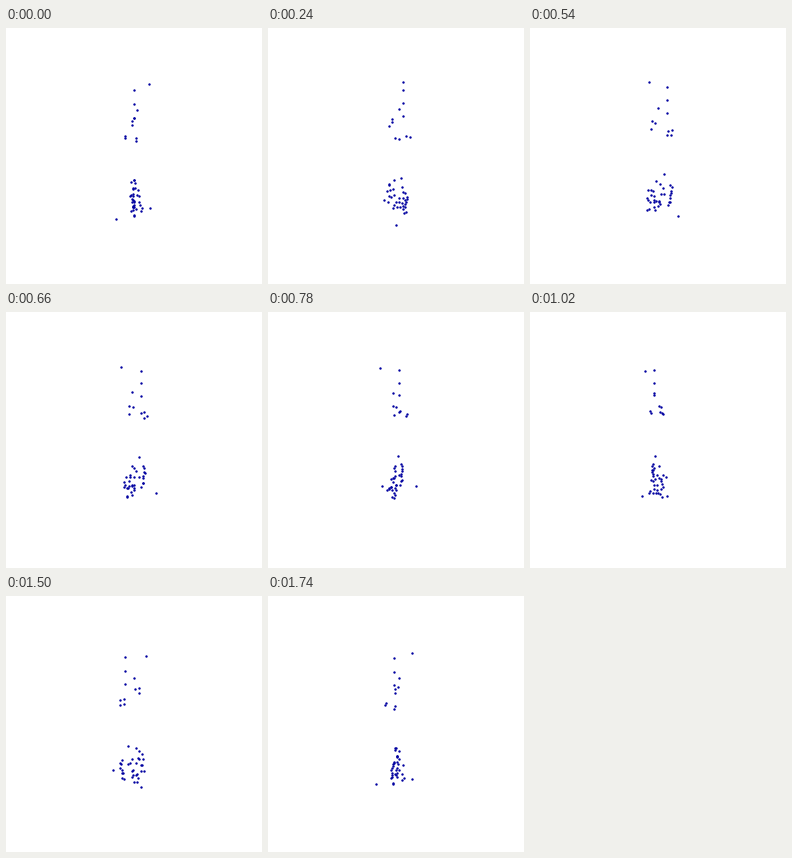
These frames come from a looping animation (256x256 px, 1800 ms). A matplotlib script:

```python
from itertools import product

import numpy as np
import matplotlib.pyplot as plt
from matplotlib.animation import FuncAnimation

SIZE, FRAMES, STEP_MS = 256, 30, 60
CX, CY = 127.7, 127.6
TILT, VIEW = 0.52, 235   # camera tilt and viewing distance
rng = np.random.default_rng(4)


def cluster(n, center, spread, top, bottom, flare=0):
    """Random points on evenly spaced heights, wider below when flared."""
    level = np.linspace(0, 1, n)
    width = 1 + flare * (level - 0.5)
    offset = rng.uniform(-1, 1, (n, 2)) * spread * width[:, None]
    heights = top + (bottom - top) * level
    return np.column_stack([np.array(center) + offset, heights])


# each point: side offset, depth, resting height on the stage
stem = [(0, -9.6, 60.5 + 13 * i) for i in range(3)]
frame = [(-3.1 + 5 * a, -11.6 - 2.6 * a + 2.4 * b, 105.4)
         for a, b in product((-1, 1), repeat=2)]
joints = [(15.6, 4.1, 57.4), (3.2, -1.1, 81.8), (0.8, 5.5, 92.8),
          (-1.8, 3.1, 94.5), (-2, 7.4, 100), (0.4, -7, 148), (0, 2.2, 153.4),
          (-16.3, -15, 179.5), (16.3, -1.1, 179.7)]
cloud = np.vstack([
    stem, frame, joints,
    cluster(9, (-2, -12.7), (2, 2.6), 160, 180),
    cluster(11, (-0.5, 7), (6, 5), 159, 181, flare=1),
    cluster(6, (4, -0.5), (6, 4), 178.5, 180),
    cluster(5, (0, -4.5), (5, 4), 160, 174),
])
side, depth, height = cloud.T


def project(turn):
    """Turn the cloud about its vertical axis and put it in perspective."""
    c, s = np.cos(turn), np.sin(turn)
    away = side * s + depth * c
    scale = 1 / (1 + away / VIEW)
    x = CX + (side * c - depth * s) * scale
    y = CY + (height - 128 - TILT * away) * scale
    return x, y


fig = plt.figure(figsize=(SIZE / 72, SIZE / 72), dpi=72, facecolor="white")
ax = fig.add_axes([0, 0, 1, 1])
ax.set(xlim=(0, SIZE), ylim=(SIZE, 0))
ax.axis("off")
dots, = ax.plot([], [], "o", ms=2.4, mew=0, color="#0000a0")


def draw(i):
    dots.set_data(*project(2 * np.pi * i / FRAMES))
    return dots,


anim = FuncAnimation(fig, draw, frames=FRAMES, interval=STEP_MS, repeat=True,
                     repeat_delay=0)
plt.show()
```
